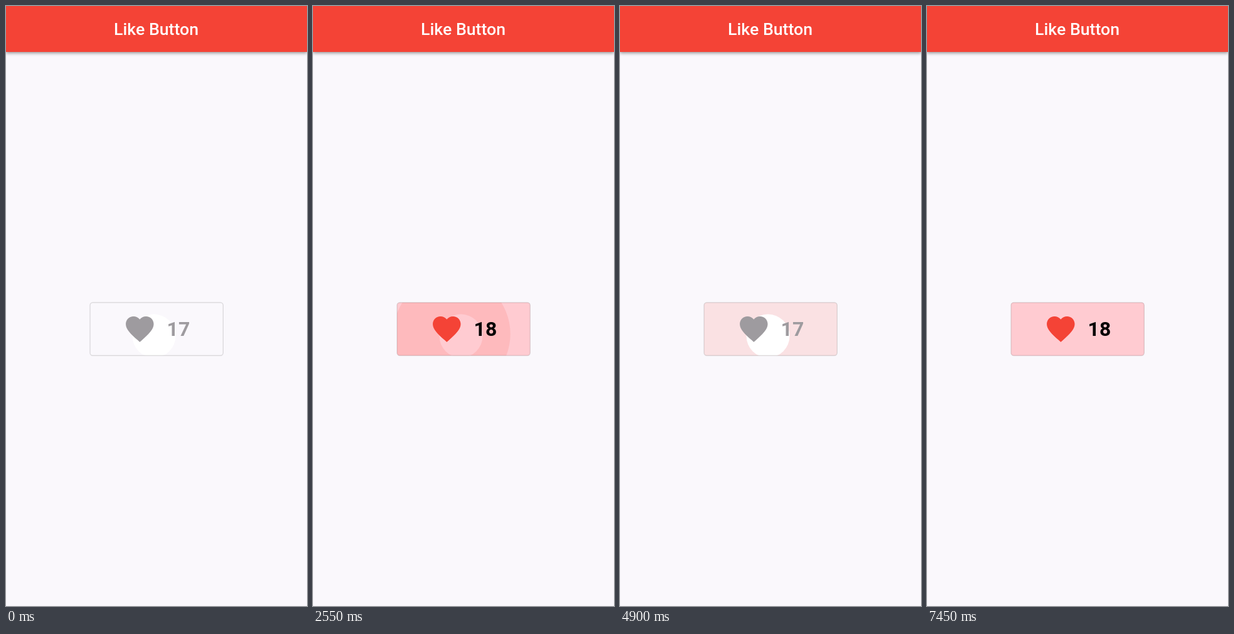
These frames come from a looping animation (480x953 px, 8000 ms). An HTML page with a canvas:

```html
<!DOCTYPE html>
<html lang="en">
<head>
<meta charset="utf-8">
<title>Like Button</title>
<style>
  html, body { margin: 0; height: 100%; overflow: hidden; background: #faf8fc; }
  canvas { display: block; }
</style>
</head>
<body>
<canvas id="stage" width="480" height="953"></canvas>
<script>
const ctx = document.getElementById('stage').getContext('2d');
const LOOP = 8000, TAU = Math.PI * 2;
const GREY = '#9e9b9f', RED = '#f44336', BLUE = '#2196f3';
const GREEN = [76, 175, 80], MINT = [105, 234, 172];
const ICON = { x: 213.3, y: 513, size: 53.4 };
const LINE = { x: 256.5, top: 494.3, height: 37.5, baseline: 524, digit: 18.4 };

// Each press: finger down, finger up, touch point.
const presses = [
  { down: 145, up: 1040, x: 291, y: 537 },
  { down: 2150, up: 3140, x: 181, y: 538 },
  { down: 4145, up: 5460, x: 180, y: 534 },
  { down: 6780, up: Infinity, x: 236, y: 524 },
];
const LIKE_MS = 680, UNLIKE_MS = 800;

const heart = new Path2D('M12 21.35l-1.45-1.32C5.4 15.36 2 12.28 2 8.5 2 5.42 4.42 3 7.5 3' +
  'c1.74 0 3.41.81 4.5 2.09C13.09 3.81 14.76 3 16.5 3 19.58 3 22 5.42 22 8.5' +
  'c0 3.78-3.4 6.86-8.55 11.54L12 21.35z');
const box = new Path2D();
box.roundRect(134, 471, 212.3, 84.3, 4.5);

const lerp = (a, b, p) => a + (b - a) * p;
const span = (v, from, to) => Math.min(1, Math.max(0, (v - from) / (to - from)));

// cubic-bezier(.25, .1, .25, 1)
function ease(x) {
  let lo = 0, hi = 1, s = 0.5;
  for (let i = 0; i < 20; i++) {
    s = (lo + hi) / 2;
    if (0.75 * s * (1 - s) + s ** 3 < x) lo = s; else hi = s;
  }
  return 0.3 * s * (1 - s) ** 2 + 3 * s * s * (1 - s) + s ** 3;
}

function overshoot(x) {
  const t = x - 1;
  return t * t * (3.5 * t + 2.5) + 1;
}

function disc(x, y, r, color) {
  ctx.fillStyle = color;
  ctx.beginPath();
  ctx.arc(x, y, r, 0, TAU);
  ctx.fill();
}

function drawBar() {
  ctx.save();
  ctx.shadowColor = 'rgba(0,0,0,.4)';
  ctx.shadowBlur = 5;
  ctx.shadowOffsetY = 2;
  ctx.fillStyle = RED;
  ctx.fillRect(0, 0, 480, 73);
  ctx.restore();
  ctx.fillStyle = '#fff';
  ctx.font = '500 26.7px Roboto, sans-serif';
  ctx.textAlign = 'center';
  ctx.fillText('Like Button', 239.5, 46);
  ctx.textAlign = 'left';
}

function drawRipple(t, press) {
  const fade = span(t, press.down, press.down + 75) * (1 - span(t, press.up + 225, press.up + 375));
  if (fade <= 0) return;
  const p = ease(span(t, press.down, press.down + 1000));
  ctx.save();
  ctx.clip(box);
  disc(lerp(press.x, 240, p), lerp(press.y, 513, p), lerp(34.5, 120.5, p), `rgba(244,67,54,${0.125 * fade})`);
  ctx.restore();
}

function drawRing(p) {
  const outer = 25 * lerp(0.1, 1, ease(span(p, 0, 0.3)));
  const grow = span(p, 0.24, 0.53);
  const inner = grow > 0 ? 25 * lerp(0.2, 1, ease(grow)) : 0;
  if (inner >= outer) return;
  ctx.fillStyle = BLUE;
  ctx.beginPath();
  ctx.arc(ICON.x, ICON.y, outer, 0, TAU);
  ctx.arc(ICON.x, ICON.y, inner, 0, TAU, true);
  ctx.fill();
}

function drawBubbles(progress) {
  const p = 1 - (1 - span(progress, 0.1, 1)) ** 2;
  if (p <= 0) return;
  const dot = ICON.size * 0.1, reach = ICON.size * 0.8;
  const burst = span(p, 0, 0.3);
  const outerR = reach * (0.8 * burst + 0.2 * span(p, 0.3, 1));
  const outerDot = dot * (1 - span(p, 0.7, 1));
  const innerDot = dot * (1 - 0.7 * span(p, 0.2, 0.5) - 0.3 * span(p, 0.5, 1));
  const alpha = 1 - span(p, 0.6, 1);
  const swing = 1 - Math.abs(2 * p - 1);
  const bubble = (angle, radius, size, mix) => {
    const rgb = GREEN.map((c, k) => Math.round(lerp(c, MINT[k], mix)));
    disc(ICON.x + radius * Math.cos(angle), ICON.y + radius * Math.sin(angle), size, `rgba(${rgb},${alpha})`);
  };
  for (let i = 0; i < 7; i++) {
    const angle = TAU / 4 + (i - 1) * TAU / 7;
    const mix = i % 2 ? 1 - swing : swing;
    bubble(angle, outerR, outerDot, mix);
    bubble(angle - TAU / 14, reach * 0.8 * burst, innerDot, 1 - mix);
  }
}

function drawHeart(scale, color) {
  ctx.save();
  ctx.translate(ICON.x, ICON.y);
  ctx.scale(scale * ICON.size / 24, scale * ICON.size / 24);
  ctx.translate(-12, -12);
  ctx.fillStyle = color;
  ctx.fill(heart);
  ctx.restore();
}

function digit(char, column, dy, color, alpha = 1) {
  ctx.globalAlpha = alpha;
  ctx.fillStyle = color;
  ctx.fillText(char, LINE.x + column * LINE.digit, LINE.baseline + dy * LINE.height);
  ctx.globalAlpha = 1;
}

// The tens cross-fade in colour while the units roll up or down.
function drawCount(liked, p) {
  const [now, before] = liked ? ['8', '7'] : ['7', '8'];
  const [color, oldColor] = liked ? ['#000', GREY] : [GREY, '#000'];
  const dir = liked ? 1 : -1;
  ctx.font = '700 32px Roboto, sans-serif';
  ctx.save();
  ctx.beginPath();
  ctx.rect(LINE.x - 2, LINE.top, 44, LINE.height);
  ctx.clip();
  digit('1', 0, 0, color, p);
  if (p < 1) {
    digit('1', 0, 0, oldColor, 1 - p);
    digit(before, 1, -dir * p, oldColor);
  }
  digit(now, 1, dir * (1 - p), color);
  ctx.restore();
}

function draw(t) {
  const released = presses.filter(press => t >= press.up);
  const liked = released.length % 2 === 1;
  const since = released.length ? t - released[released.length - 1].up : Infinity;
  const p = span(since, 0, liked ? LIKE_MS : UNLIKE_MS);

  ctx.fillStyle = '#faf8fc';
  ctx.fillRect(0, 0, 480, 953);
  drawBar();

  if (liked) {
    ctx.fillStyle = '#ffcbd1';
    ctx.fill(box);
  }
  presses.forEach(press => drawRipple(t, press));
  ctx.strokeStyle = 'rgba(0,0,0,.12)';
  ctx.lineWidth = 1.4;
  ctx.stroke(box);

  const playing = liked && p < 1;
  if (playing) {
    drawRing(p);
    drawBubbles(p);
  }
  drawHeart(playing ? lerp(0.2, 1, overshoot(span(p, 0.35, 0.7))) : 1, liked ? RED : GREY);
  drawCount(liked, p);
}

const start = performance.now();
function tick() {
  draw((performance.now() - start) % LOOP);
  requestAnimationFrame(tick);
}
tick();
</script>
</body>
</html>
```
